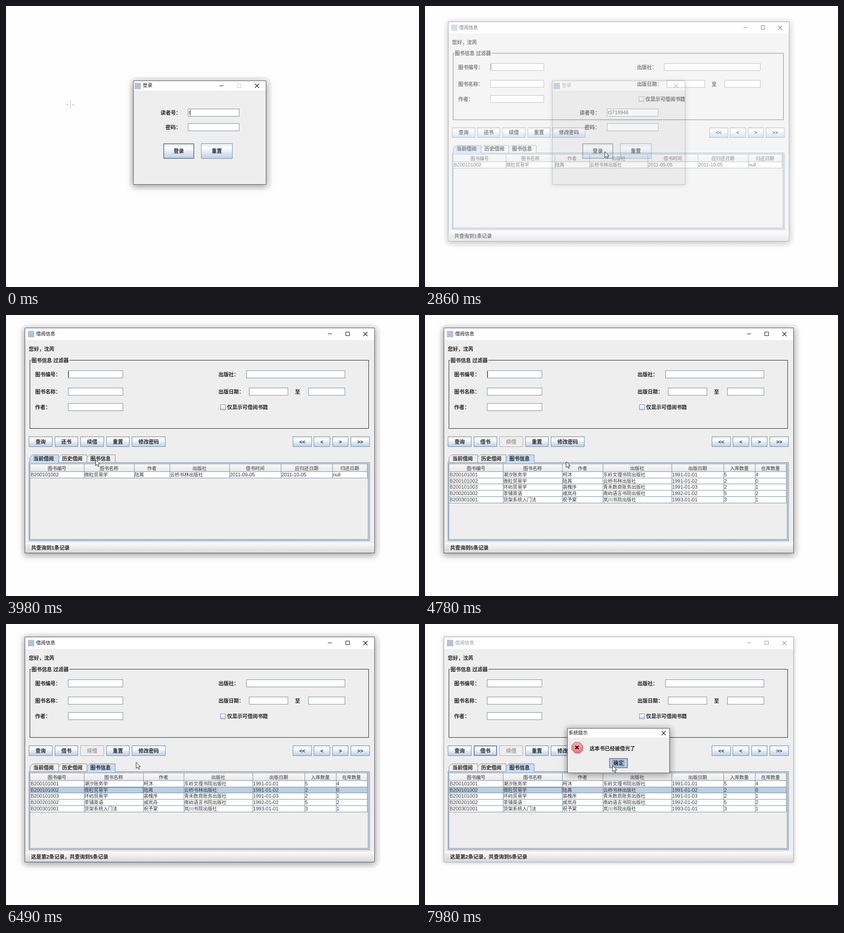
An HTML page with a canvas for the animation above (8 s loop, 906 px wide and 618 px high).

```html
<!DOCTYPE html>
<html lang="zh-CN">
<head>
<meta charset="utf-8">
<style>
html, body { margin: 0; width: 906px; height: 618px; overflow: hidden; background: #fefefe; }
canvas { display: block; }
</style>
</head>
<body>
<canvas id="stage" width="906" height="618"></canvas>
<script>
const stage = document.getElementById('stage');
const layer = stage.cloneNode().getContext('2d');
let c = stage.getContext('2d');
const LOOP = 8000, EDGE = '#7a8a99', BODY = '#eee', BLUE = '#b8cfe5', TAB = '#c8ddf2';
const FONT = '"Liberation Sans", "Noto Sans CJK SC", "Noto Sans CJK", sans-serif';
const USER = 't3718946';
const typeTimes = [150, 315, 480, 645, 810, 1080, 1360];

// The pointer is redrawn in bursts: first time, last time, steps
const bursts = [[1630, 2410, 7], [2710, 3680, 8], [3830, 4100, 3], [4380, 4780, 4],
  [4930, 5380, 4], [5510, 6490, 8], [6640, 7580, 8], [7710, 7980, 3]];
const path = [[1760, 250, 262], [1890, 293, 306], [2150, 365, 322], [2410, 394, 320],
  [2990, 394, 320], [3680, 230, 330], [3965, 196, 318], [4100, 196, 318], [4380, 215, 318],
  [4780, 309, 322], [5080, 285, 362], [5230, 277, 365], [5380, 277, 365], [5790, 470, 400],
  [6070, 645, 413], [6350, 400, 340], [6490, 285, 304], [6770, 150, 280], [6900, 128, 279],
  [7180, 128, 279], [7580, 387, 320], [7710, 395, 316], [7845, 408, 312], [7980, 411, 311]];

const loans = {
  cols: [53, 171, 281, 359, 490, 603, 716, 792],
  head: ['图书编号', '图书名称', '作者', '出版社', '借书时间', '应归还日期', '归还日期'],
  rows: [['B200101002', '微粒贸易学', '陆苒', '云桥书林出版社', '2011-09-05', '2011-10-05', 'null']]
};
const books = {
  cols: [53, 171, 301, 390, 541, 655, 724, 792],
  head: ['图书编号', '图书名称', '作者', '出版社', '出版日期', '入库数量', '在库数量'],
  rows: [
    ['B200101001', '潮汐账务学', '柯沐', '东岭文理书院出版社', '1991-01-01', '5', '4'],
    ['B200101002', '微粒贸易学', '陆苒', '云桥书林出版社', '1991-01-02', '2', '0'],
    ['B200101003', '环屿贸易学', '裴槐序', '青禾数商账务出版社', '1991-01-03', '2', '1'],
    ['B200201002', '茶铺英语', '戚岚舟', '南屿语言书院出版社', '1992-01-02', '5', '2'],
    ['B200301001', '货架系统入门法', '祝予棠', '岚川书院出版社', '1993-01-01', '3', '1']
  ]
};

function fill(x, y, w, h, color) { c.fillStyle = color; c.fillRect(x, y, w, h); }
function frame(x, y, w, h, color = EDGE) {
  c.strokeStyle = color;
  c.lineWidth = 1;
  c.strokeRect(x + .5, y + .5, w - 1, h - 1);
}
function line(color, width, ...pts) {
  c.beginPath();
  pts.forEach(([x, y]) => c.lineTo(x, y));
  c.strokeStyle = color;
  c.lineWidth = width;
  c.stroke();
}
function write(s, x, y, font, color, align) {
  c.font = font + ' ' + FONT;
  c.fillStyle = color;
  c.textAlign = align;
  c.textBaseline = 'middle';
  c.fillText(s, x, y);
}
const label = (s, x, y, color = '#222', align = 'left') => write(s, x, y, 'bold 11.2px', color, align);
const plain = (s, x, y, align = 'left', color = '#333') =>
  write(s, x, y, /[^\x00-\xff]/.test(s) ? '10.3px' : '10.9px', color, align);

function gradient(y, h, ...stops) {
  const g = c.createLinearGradient(0, y, 0, y + h);
  stops.forEach(([at, color]) => g.addColorStop(at, color));
  return g;
}
const ocean = (y, h) => gradient(y, h, [0, '#dde8f3'], [.3, '#fff'], [.6, '#dde8f3'], [1, BLUE]);

function field(x, y, w, caret) {
  fill(x, y, w, 17, '#fff');
  frame(x, y, w, 17);
  if (caret) fill(x + 1, y + 2, 1, 13, '#333');
}
function button(s, x, y, w, h, { focus, pressed, off } = {}) {
  fill(x, y, w, h, off ? BODY : pressed ? BLUE : ocean(y, h));
  frame(x, y, w, h, off ? '#aaa' : EDGE);
  if (focus) frame(x + 1, y + 1, w - 2, h - 2);
  label(s, x + w / 2, y + h / 2 + 1, off ? '#999' : '#222', 'center');
}
function win(x, y, w, h, bar, title, { active = true, icon, pad = 3, tools = true, noMax } = {}) {
  const ink = active ? '#111' : '#999', cy = y + bar / 2, r = x + w - 21;
  if (active) {
    c.beginPath();
    c.roundRect(x - 8, y - 8, w + 20, h + 20, 16);
    c.fillStyle = 'rgba(0,0,0,.03)';
    c.fill();
  }
  c.save();
  c.shadowColor = active ? 'rgba(0,0,0,.4)' : 'rgba(0,0,0,.25)';
  c.shadowBlur = active ? 14 : 8;
  c.shadowOffsetY = active ? 3 : 1;
  fill(x, y, w, h, BODY);
  c.restore();
  fill(x, y, w, bar, '#fff');
  frame(x, y, w, h, active ? '#555' : '#aaa');
  if (icon) fill(x + pad, Math.floor(cy) - 6, 14, 14, '#b4c3d4');
  write(title, x + pad + (icon ? 18 : 0), cy + .5, '10.5px', ink, 'left');
  const cx = tools || icon ? r : x + w - 14;
  line(ink, 1.1, [cx - 4, cy - 4], [cx + 5, cy + 5]);
  line(ink, 1.1, [cx + 5, cy - 4], [cx - 4, cy + 5]);
  if (!tools) return;
  fill(r - 82, Math.floor(cy), 9, 1, ink);
  frame(r - 43, Math.floor(cy) - 4, 9, 9, noMax ? '#ccc' : ink);
}

function login(t) {
  const closing = t >= 2860;
  win(279, 164, 292, 229, 22, '登录', { icon: true, active: !closing, tools: !closing, noMax: true });
  label('读者号：', 339, 236);
  label('密码：', 350, 268);
  field(399, 226, 113);
  field(399, 258, 113);
  const typed = USER.slice(0, 1 + typeTimes.filter(k => t >= k).length);
  plain(typed, 401, 235);
  if (t < 1860 || t >= 2360 && !closing)
    fill(Math.round(401 + c.measureText(typed).width), 228, 1, 13, '#333');
  button('登录', 345, 302, 68, 34, { focus: true, pressed: t >= 2710 && !closing });
  button('重置', 428, 302, 69, 34);
}

function tab(s, x, w, on) {
  c.beginPath();
  [[x, 324], [x, 314], [x + 6, 308], [x + w, 308], [x + w, 324]].forEach(p => c.lineTo(...p));
  c.fillStyle = on ? TAB : BODY;
  c.fill();
  line(EDGE, 1, [x + .5, 324], [x + .5, 313.5], [x + 6.5, 307.5], [x + w + .5, 307.5], [x + w + .5, 324]);
  label(s, x + 8, 316.5);
}

function table({ cols, head, rows }, picked) {
  const left = cols[0], w = cols[7] - left, pitch = 13.7;
  const rowY = i => Math.round(345 + i * pitch);
  fill(left, 328, w, 17, gradient(328, 17, [0, '#f8f8f8'], [1, '#e8e8e8']));
  fill(left, 344, w, 1, EDGE);
  rows.forEach((row, i) => {
    const y = rowY(i), h = rowY(i + 1) - y;
    fill(left, y, w, h, i === picked ? BLUE : '#fff');
    fill(left, y + h - 1, w, 1, EDGE);
    row.forEach((s, k) => plain(s, cols[k] + 1, y + 7));
    if (i === picked) frame(cols[1], y, cols[2] - cols[1], h, '#6382bf');
  });
  head.forEach((s, k) => {
    plain(s, (cols[k] + cols[k + 1]) / 2, 338, 'center');
    fill(cols[k + 1], 328, 1, rowY(rows.length) - 328, EDGE);
  });
}

function library(t, active) {
  const info = t >= 4100, picked = t >= 5230;
  win(41, 28, 768, 496, 27, '借阅信息', { active, icon: true, pad: 7 });
  label('您好，沈芮', 50, 76);
  frame(52, 99, 744, 151, '#222');
  fill(55, 97, 84, 5, BODY);
  label('图书信息 过滤器', 56, 101);

  label('图书编号：', 64, 132);
  label('图书名称：', 64, 170);
  label('作者：', 64, 204);
  label('出版社：', 466, 132);
  label('出版日期：', 466, 170);
  label('至', 634, 170);
  field(136, 122, 121, !picked && Math.floor((t - 2710) / 500) % 2 === 0);
  field(136, 160, 121);
  field(136, 194, 121);
  field(527, 122, 217);
  field(533, 160, 86);
  field(663, 160, 81);
  fill(470, 197, 12, 12, ocean(197, 12));
  frame(470, 197, 12, 12);
  label('仅显示可借阅书籍', 485, 204);

  button('查询', 50, 267, 52, 23);
  button(info ? '借书' : '还书', 107, 267, 51, 23, { focus: t >= 7040, pressed: t >= 7040 && t < 7175 });
  button('续借', 163, 267, 52, 23, { off: info });
  button('重置', 220, 267, 51, 23);
  button('修改密码', 276, 267, 74, 23);
  button('<<', 629, 267, 42, 23);
  button('<', 675, 267, 36, 23);
  button('>', 716, 267, 35, 23);
  button('>>', 756, 267, 42, 23);

  fill(50, 324, 748, 173, TAB);
  frame(50, 324, 748, 173);
  fill(52, 327, 743, 167, BODY);
  frame(52, 327, 743, 167);
  tab('当前借阅', 52, 63, !info);
  tab('历史借阅', 115, 62, false);
  tab('图书信息', 177, 62, info);
  fill(info ? 178 : 53, 324, 61, 1, TAB);
  table(info ? books : loans, picked ? 1 : -1);

  fill(42, 501, 766, 22, gradient(501, 22, [0, '#fbfbfb'], [1, '#dadada']));
  for (let y = 504; y < 520; y += 2)
    for (let x = 44 + y / 2 % 2 * 2; x < 53; x += 4) fill(x, y, 1, 1, '#aaa');
  label((picked ? '这是第2条记录，' : '') + `共查询到${info ? 5 : 1}条记录`, 55, 512.5);
}

function alertBox(t) {
  win(312, 229, 225, 99, 21, '系统提示', { tools: false });
  c.beginPath();
  for (let i = 0; i < 8; i++) {
    const a = (i + .5) * Math.PI / 4;
    c.lineTo(333.5 + 12.5 * Math.cos(a), 271.5 + 12.5 * Math.sin(a));
  }
  c.closePath();
  c.save();
  c.shadowColor = 'rgba(0,0,0,.35)';
  c.shadowBlur = 3;
  c.shadowOffsetX = c.shadowOffsetY = 2;
  c.fillStyle = gradient(259, 25, [0, '#f4a9a9'], [1, '#e57c80']);
  c.fill();
  c.restore();
  c.strokeStyle = '#c0565b';
  c.lineWidth = 1;
  c.stroke();
  line('#5a0d12', 2.6, [330, 268], [337, 275]);
  line('#5a0d12', 2.6, [337, 268], [330, 275]);
  write('这本书已经被借光了', 361, 274.5, 'bold 11.1px', '#222', 'left');
  button('确定', 404, 295, 41, 22, { focus: true, pressed: t >= 7980 });
  frame(411, 299, 26, 14, '#6382bf');
}

function pointerTime(t) {
  const burst = bursts.filter(b => t >= b[0]).pop();
  if (!burst) return 0;
  const [start, end, n] = burst, step = (end - start) / (n - 1);
  return start + Math.min(n - 1, Math.floor((t - start) / step + .001)) * step;
}
function crosshair(x, y) {
  for (const d of [-8, -6, 5, 7]) {
    fill(x + d, y, 1, 1, '#222');
    fill(x, y + d, 1, 1, '#222');
  }
  fill(x, y, 1, 1, '#222');
}
function pointer(t) {
  const q = pointerTime(t);
  if (q < 1760) return q < 1630 ? crosshair(141, 217) : crosshair(175, 184);
  const i = Math.max(1, path.findIndex(p => p[0] >= q - .01));
  const [a, b] = [path[i - 1], path[i]];
  const k = (q - a[0]) / (b[0] - a[0]);
  c.save();
  c.translate(Math.round(a[1] + (b[1] - a[1]) * k) + .5, Math.round(a[2] + (b[2] - a[2]) * k) + .5);
  c.beginPath();
  [[0, 0], [0, 13], [3, 10.2], [5.2, 15], [7.4, 14], [5.3, 9.3], [9.4, 9.3]].forEach(p => c.lineTo(...p));
  c.closePath();
  c.fillStyle = '#fff';
  c.fill();
  c.strokeStyle = '#222';
  c.lineWidth = 1;
  c.stroke();
  c.restore();
}

// Draws a whole window apart, then blends it in as one piece
function faded(alpha, drawPart, { scale = 1, blend = 'source-over' } = {}) {
  const base = c;
  c = layer;
  c.clearRect(0, 0, 906, 618);
  c.save();
  c.translate(424.5, 275.5);
  c.scale(scale, scale);
  c.translate(-424.5, -275.5);
  drawPart();
  c.restore();
  c = base;
  c.save();
  c.globalAlpha = alpha;
  c.globalCompositeOperation = blend;
  c.drawImage(layer.canvas, 0, 0);
  c.restore();
}

function draw(t) {
  fill(0, 0, 906, 618, '#fefefe');
  if (t < 2860) login(t);
  else if (t < 2990) {
    faded(.56, () => library(t, true), { scale: .975 });
    faded(.6, () => login(t), { blend: 'multiply' });
  } else library(t, t < 7175);
  if (t >= 7310) alertBox(t);
  else if (t >= 7175) faded(.5, () => alertBox(t));
  pointer(t);
}

function tick() {
  draw(performance.now() % LOOP);
  requestAnimationFrame(tick);
}
tick();
</script>
</body>
</html>
```
